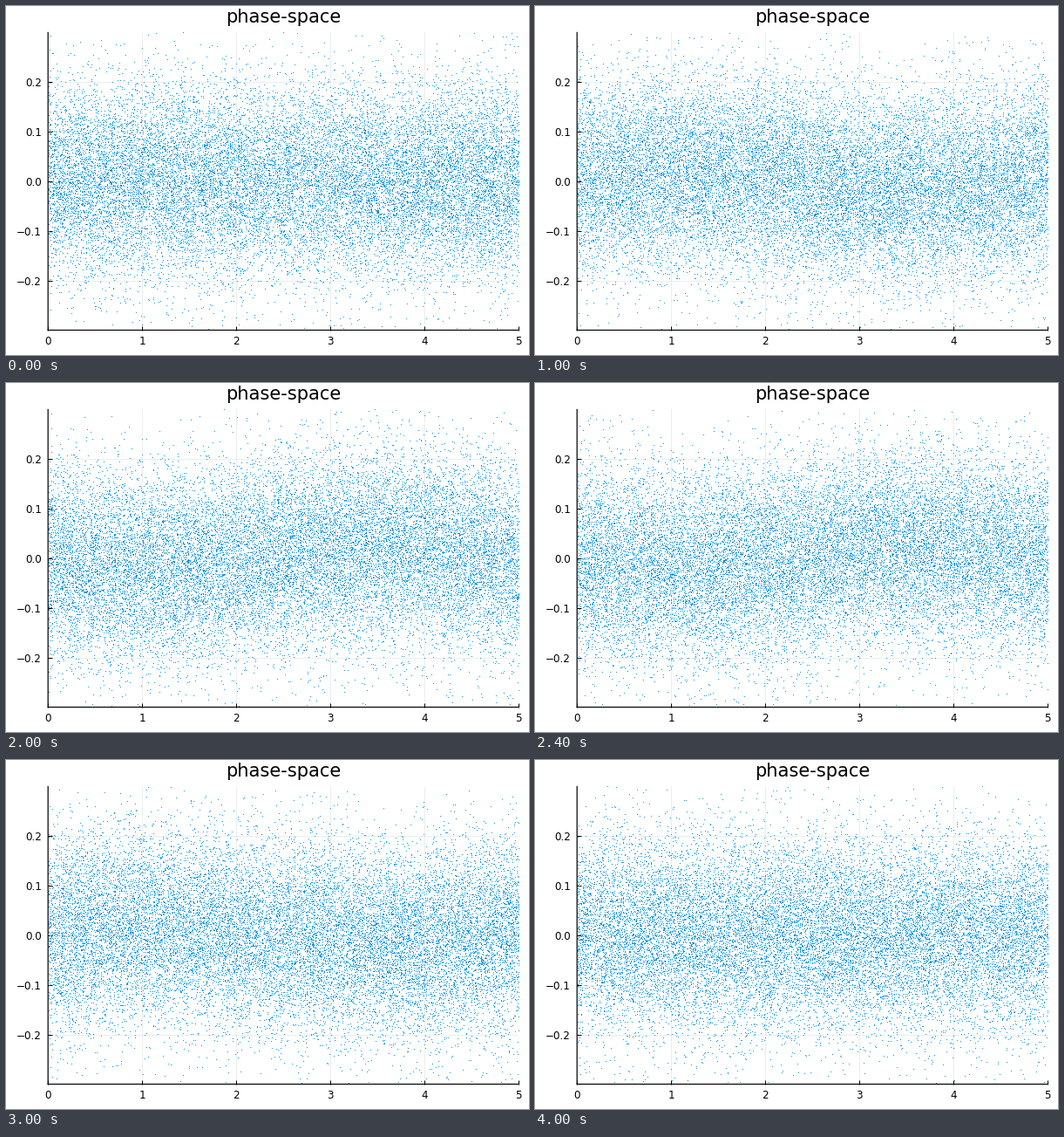
Animation of 600x400 px, one loop 4200 ms. Source, as a matplotlib script:

```python
import numpy as np
import matplotlib.pyplot as plt
from matplotlib.animation import FuncAnimation

WIDTH, HEIGHT, DPI = 600, 400, 100
FRAMES, INTERVAL = 21, 200
LENGTH, V_MAX = 5.0, 0.3
COUNT, V_THERMAL = 20000, 0.1
WAVE_SPEED = 0.023           # velocity amplitude of the standing wave
WAVE_OFFSET = 0.2
PHASE_STEP = 0.95 * np.pi    # plasma oscillation phase per frame
K = 2 * np.pi / LENGTH
LEFT, RIGHT, TOP, BOTTOM = 48.2, 588.2, 30.4, 371.5

BLUE, DARK = "#009afa", "#2a6f99"

rng = np.random.default_rng(7)
start = rng.uniform(0, LENGTH, COUNT)
drift = rng.normal(0, V_THERMAL, COUNT)


def px(points):
    """Font size or line width in points for a length in pixels."""
    return points * 72 / DPI


def particles(frame):
    """Free-streaming particles carried by a standing plasma wave."""
    phase = PHASE_STEP * frame
    x = start + drift * phase
    wave = WAVE_SPEED * np.sin(K * (x + WAVE_OFFSET))
    return (x - wave * np.cos(phase)) % LENGTH, drift + wave * np.sin(phase)


def snap(x, v):
    """Whole-pixel cells, split into singly and multiply occupied ones."""
    col = np.floor(x / LENGTH * (RIGHT - LEFT))
    row = np.floor((v + V_MAX) / (2 * V_MAX) * (BOTTOM - TOP))
    inside = np.abs(v) < V_MAX
    cells = np.column_stack([col, row])[inside]
    cells, hits = np.unique(cells, axis=0, return_counts=True)
    cells = (cells + 0.5) / [RIGHT - LEFT, BOTTOM - TOP]
    cells = cells * [LENGTH, 2 * V_MAX] - [0, V_MAX]
    return cells[hits == 1].T, cells[hits > 1].T


plt.rcParams["font.family"] = "DejaVu Sans"
fig = plt.figure(figsize=(WIDTH / DPI, HEIGHT / DPI), dpi=DPI, facecolor="white")
ax = fig.add_axes([LEFT / WIDTH, 1 - BOTTOM / HEIGHT,
                   (RIGHT - LEFT) / WIDTH, (BOTTOM - TOP) / HEIGHT])
ax.set(xlim=(0, LENGTH), ylim=(-V_MAX, V_MAX),
       xticks=range(6), yticks=[-0.2, -0.1, 0, 0.1, 0.2])
ax.yaxis.set_major_formatter(lambda v, _: f"{v:.1f}".replace("-", "\u2212"))
ax.spines[["top", "right"]].set_visible(False)
for side in ("left", "bottom"):
    ax.spines[side].set(linewidth=px(1.2), snap=False)
ax.tick_params(direction="in", length=px(5), width=px(1), labelsize=px(12))
ax.tick_params(axis="x", pad=px(6))
ax.tick_params(axis="y", pad=px(7.2))
ax.grid(color="black", alpha=0.1, linewidth=px(0.7))
ax.set_axisbelow(True)
fig.text(318.2 / WIDTH, 1 - 19 / HEIGHT, "phase-space", size=px(21),
         ha="center", va="baseline")

style = dict(linestyle="none", marker=",", antialiased=False)
singles, = ax.plot([], [], color=BLUE, **style)
overlaps, = ax.plot([], [], color=DARK, **style)


def update(frame):
    single, overlap = snap(*particles(frame))
    singles.set_data(*single)
    overlaps.set_data(*overlap)
    return singles, overlaps


anim = FuncAnimation(fig, update, frames=FRAMES, interval=INTERVAL,
                     repeat=True, repeat_delay=0)
plt.show()
```
